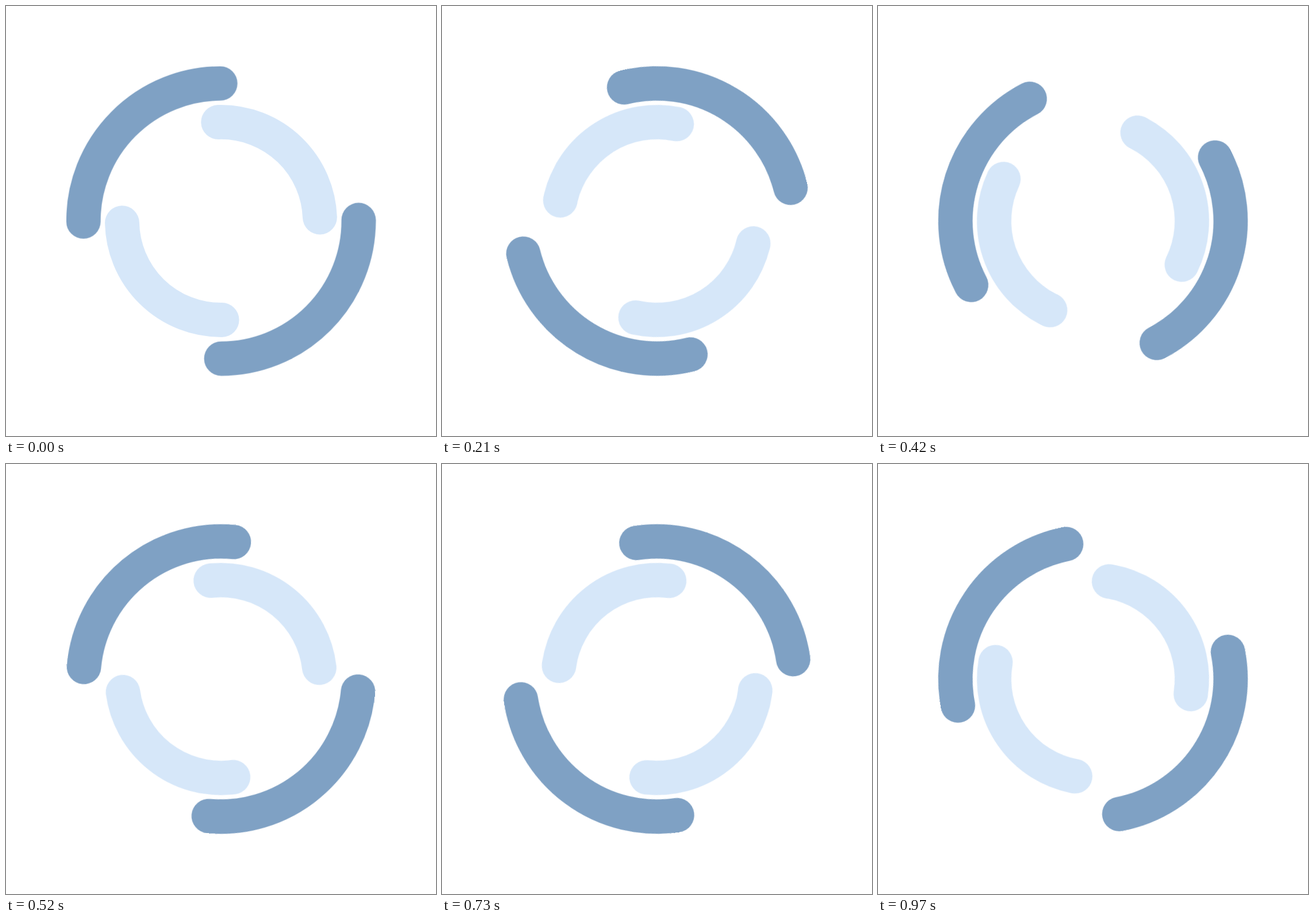
An HTML page for the animation above (1000 ms loop, 748 by 748 pixels).

```html
<!DOCTYPE html>
<html lang="en">
<head>
<meta charset="utf-8">
<title>Double ring loader</title>
<style>
  html, body { margin: 0; width: 100%; height: 100%; overflow: hidden; background: #fff; }
  svg { display: block; width: 100vw; height: 100vh; }
  circle {
    fill: none;
    stroke-width: 8;
    stroke-linecap: round;
    stroke-dasharray: 1 1;
    transform-origin: 50px 50px;
    /* the 1 ms lead keeps step edges clear of rounding */
    animation: spin 1s -1ms infinite;
  }
  .outer { --turn: 360deg; stroke: #7fa1c4; }
  .inner { --turn: -360deg; stroke: #d6e7f9; stroke-dashoffset: 1; }

  /* 33 equal turns of 30 ms each, with one held for 40 ms at 480 ms */
  @keyframes spin {
    0%   { transform: rotate(0deg); animation-timing-function: steps(16, end); }
    48%  { transform: rotate(calc(var(--turn) * 16 / 33)); animation-timing-function: steps(1, end); }
    52%  { transform: rotate(calc(var(--turn) * 17 / 33)); animation-timing-function: steps(16, end); }
    100% { transform: rotate(var(--turn)); }
  }
</style>
</head>
<body>
<svg viewBox="0 0 100 100">
  <circle class="outer" cx="50" cy="50" r="32" pathLength="4"/>
  <circle class="inner" cx="50" cy="50" r="23" pathLength="4"/>
</svg>
</body>
</html>
```
